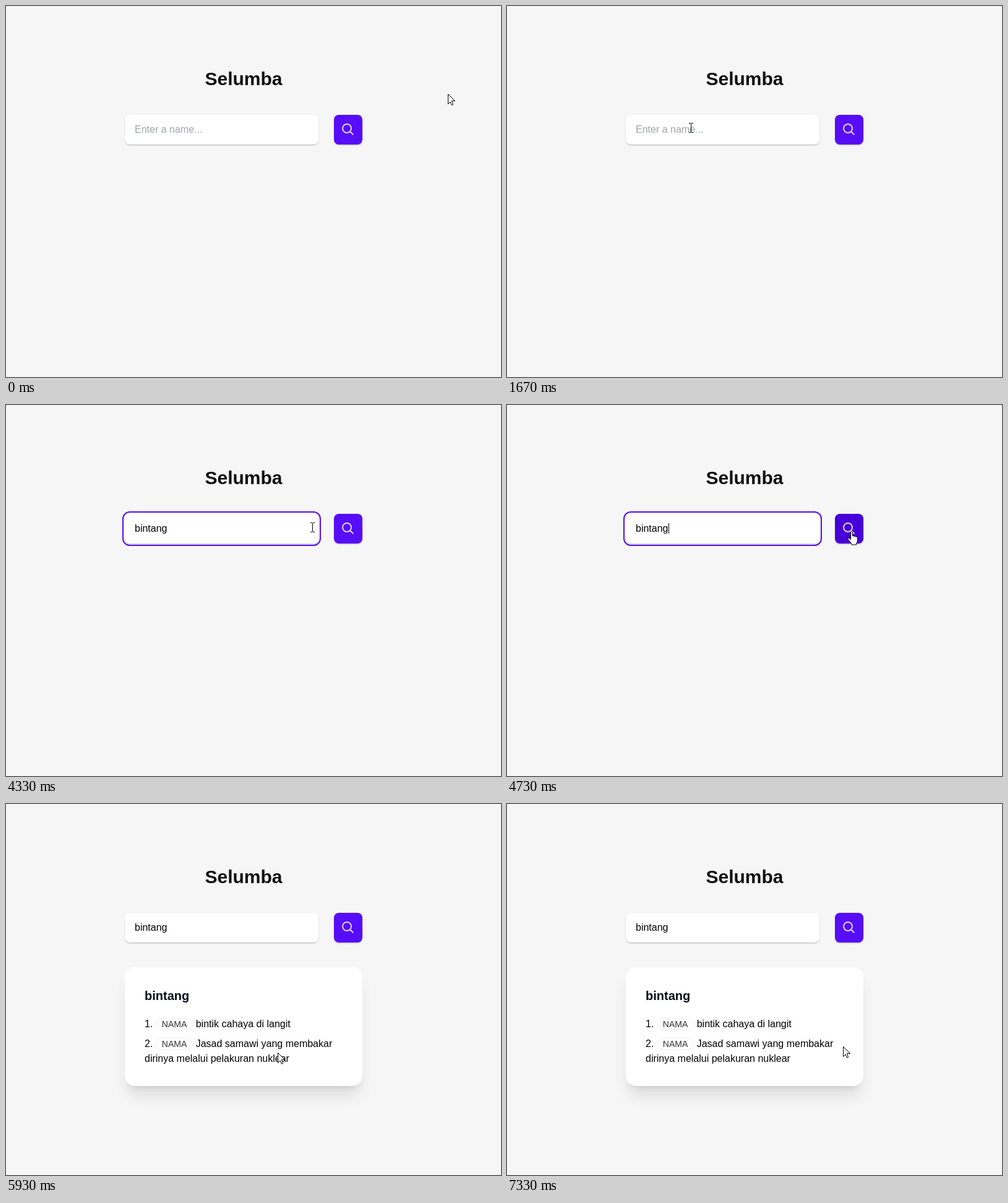
Recreate the animation shown at these times as an HTML page. Size 800 by 600 pixels, loop 8000 ms.

```html
<!DOCTYPE html>
<html lang="ms">
<head>
<meta charset="utf-8">
<title>Selumba</title>
<style>
html, body { margin: 0; width: 100%; height: 100%; overflow: hidden; background: #f6f6f6; }
body { position: relative; font: 16px/24px "Liberation Sans", Arial, sans-serif; color: #000; }
h1, h2, p { margin: 0; }
h1, #field, #button, #card, #pointer { position: absolute; box-sizing: border-box; }
h1 { left: 192px; top: 100px; width: 384px; font-size: 30px; line-height: 36px; text-align: center; color: #0f0f10; }
#field, #button { top: 176px; height: 48px; border-radius: 8px; box-shadow: 0 1px 3px #0000001a, 0 2px 2px -1px #0003; }
#field { left: 192px; width: 313px; padding: 12px 16px; background: #fff; }
#field.focus { outline: 2px solid #570df8; outline-offset: 2px; }
#field.empty { color: #9fa3a9; }
#caret { position: absolute; top: 15px; width: 1px; height: 17px; background: #000; }
#button { left: 530px; width: 46px; }
#button svg { position: absolute; left: 11px; top: 12px; fill: none; stroke: #e0d2fe; stroke-width: 2; }
#card { left: 192px; top: 264px; width: 384px; height: 192px; padding: 32px; border-radius: 16px; background: #fff;
  box-shadow: 0 20px 25px -5px #0000001a, 0 8px 10px -6px #0000001a; }
h2 { margin-bottom: 20px; font-size: 20px; line-height: 28px; color: #050a18; }
p { white-space: nowrap; }
p + p { margin-top: 8px; }
b { display: inline-block; box-sizing: border-box; height: 20px; margin-top: -2px; padding: 0 9px;
  border: 1px solid #eee; border-radius: 10px; font-weight: 400; font-size: 14px; line-height: 18px;
  color: #333; vertical-align: middle; }
#pointer { left: 0; top: 0; overflow: visible; fill: #fff; stroke: #000; }
</style>
</head>
<body>
<h1>Selumba</h1>
<div id="field"><span id="text"></span><i id="caret"></i></div>
<div id="button"><svg width="24" height="24"><path d="M20.3 20.3L15 15m2-5a7 7 0 1 1-14 0 7 7 0 0 1 14 0z"/></svg></div>
<div id="card">
  <h2>bintang</h2>
  <p>1. <b>NAMA</b> bintik cahaya di langit</p>
  <p>2. <b>NAMA</b> Jasad samawi yang membakar<br>dirinya melalui pelakuran nuklear</p>
</div>
<svg id="pointer" width="1" height="1"><path id="shape"/></svg>
<script>
// The screen updates RATE times a second; all times below count updates.
const RATE = 15, LENGTH = 8 * RATE;
const FOCUS = 28, TYPE = 41, TYPED = 54, HOVER = 67, CLICK = 72, LEAVE = 75, BLINK = 8;
const WORD = 'bintang';

const [field, text, caret, button, card, pointer, shape] =
  ['field', 'text', 'caret', 'button', 'card', 'pointer', 'shape'].map(id => document.getElementById(id));

const shapes = {
  arrow: 'M.5.5v16l3.5-3.5 2.5 5.5 2-1-2-6h5z',
  beam: 'M-3-7.5h3m1 0h3M-3 7.5h3m1 0h3M.5-7v14',
  hand: 'M-1.5 13V1.5q1.5-2 3 0V8q1.6-1.4 3 .5 1.6-1 2.8.6 2-.6 2.2 1.4V15q0 3-2 5v2H0v-1.5L-6 13q-.8-2 1.2-2 1.6.6 3.3 2.6z'
};

// Pointer strokes: begin, end and destination; it rests in between.
const home = { x: 714, y: 142 };
const strokes = [
  { from: 15, to: 17, x: 292, y: 200 },
  { from: 17, to: 19, x: 562, y: 235 },
  { from: 21, to: 25, x: 297, y: 197 },
  { from: 61, to: 65, x: 495, y: 198 },
  { from: 65, to: 72, x: 558, y: 204 },
  { from: 75, to: 79, x: 646, y: 233 },
  { from: 85, to: 89, x: 439, y: 402 },
  { from: 92, to: 96, x: 605, y: 237 },
  { from: 96, to: 105, x: 209, y: 519 },
  { from: 105, to: 110, x: 543, y: 392 }
];

const ramp = (k, from, to) => Math.min(1, Math.max(0, (k - from) / (to - from)));
const easeOut = f => f * (2 - f);

function position(k) {
  let { x, y } = home;
  for (const s of strokes) {
    const f = easeOut(ramp(k, s.from, s.to));
    x += (s.x - x) * f;
    y += (s.y - y) * f;
  }
  return [Math.round(x), Math.round(y)];
}

function cursorAt(x, y) {
  if (y < 176 || y >= 224) return 'arrow';
  if (x >= 192 && x < 505) return 'beam';
  return x >= 530 && x < 576 ? 'hand' : 'arrow';
}

function draw(k) {
  const count = k < TYPE ? 0 : 1 + Math.floor(ramp(k, TYPE, TYPED) * (WORD.length - 1));
  const focus = k >= FOCUS && k < CLICK;
  field.classList.toggle('focus', focus);
  field.classList.toggle('empty', !count);
  text.textContent = WORD.slice(0, count) || 'Enter a name...';

  // The caret stays lit while letters arrive.
  const idle = k < TYPE ? k - FOCUS : Math.max(0, k - TYPED);
  const lit = focus && idle % (2 * BLINK) < BLINK;
  caret.style.display = lit ? 'block' : 'none';
  caret.style.left = 16 + (count && Math.floor(text.offsetWidth)) + 'px';

  const hover = ramp(k, HOVER, HOVER + 3) - ramp(k, LEAVE, LEAVE + 3);
  button.style.background = `color-mix(in srgb, #4800d8 ${hover * 100}%, #570df8)`;
  card.style.opacity = ramp(k, LEAVE - 2, LEAVE);

  const [x, y] = position(k);
  shape.setAttribute('d', shapes[cursorAt(x, y)]);
  pointer.style.transform = `translate(${x}px, ${y}px)`;
}

const start = performance.now();
function tick() {
  // A few ms of lead keep rounded times on the right update.
  draw(Math.floor((performance.now() - start + 4) * RATE / 1000) % LENGTH);
  requestAnimationFrame(tick);
}
tick();
</script>
</body>
</html>
```
